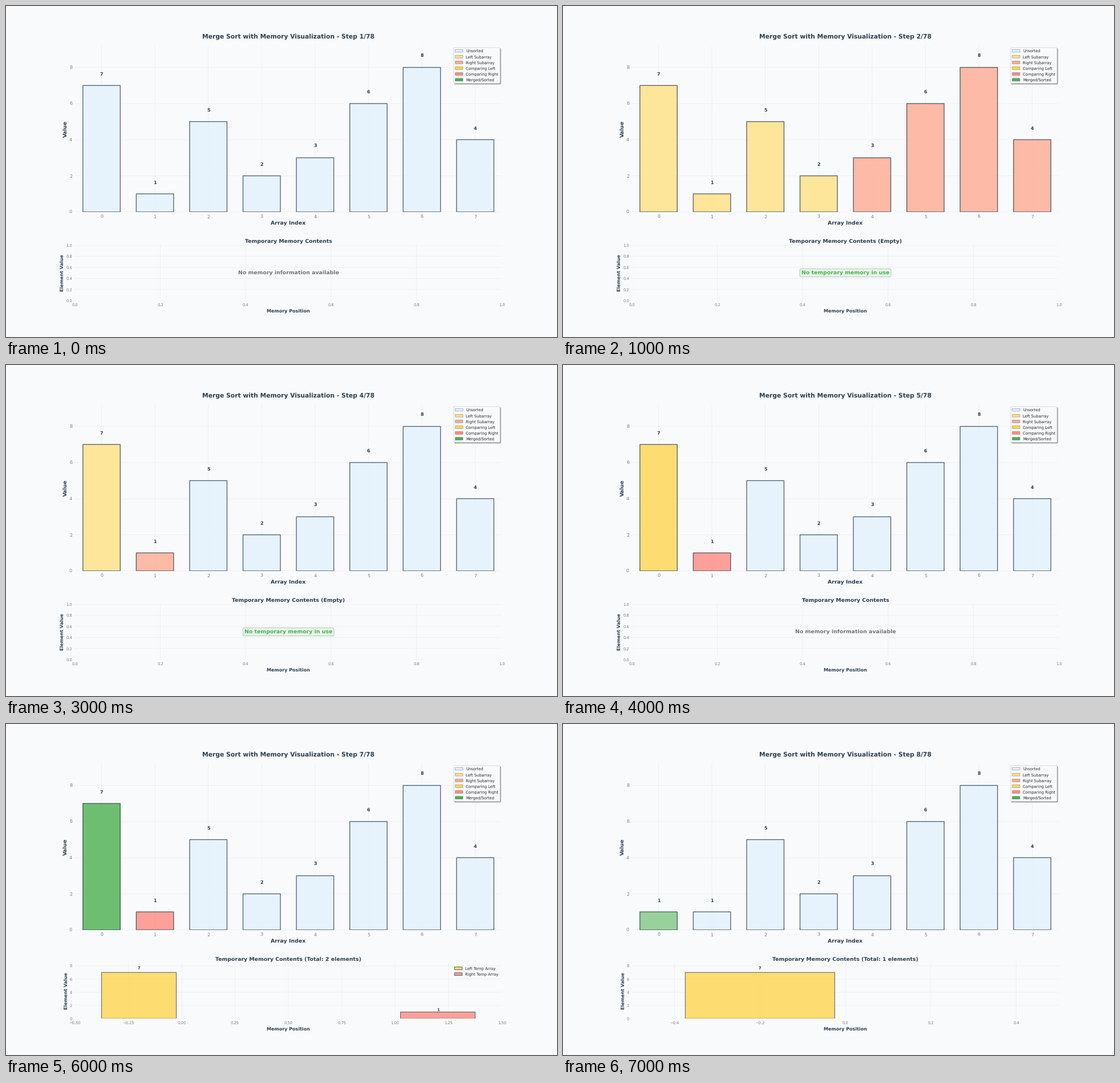
Write a matplotlib script that moves like this. It is 966 by 580 pixels and loops after 8000 ms.

```python
import matplotlib.pyplot as plt
import numpy as np
from matplotlib.animation import FuncAnimation
from matplotlib.patches import Patch

DPI = 48.3
BG, INK, TICK = "#f8fafc", "#2c3e50", "#808080"

plt.rcParams.update({
    "font.family": "DejaVu Sans",
    "text.hinting": "none",
    "text.color": "0.15",
    "path.snap": False,
    "figure.facecolor": BG,
    "axes.facecolor": BG,
    "axes.axisbelow": True,
    "axes.titlecolor": INK,
    "axes.titleweight": "bold",
    "axes.labelcolor": INK,
    "axes.labelweight": "bold",
    "grid.color": "0.8",
    "grid.linewidth": 1,
    "grid.alpha": 0.3,
    "legend.fontsize": 10,
})
for side in ("left", "right", "top", "bottom"):
    plt.rcParams["axes.spines." + side] = False
for tick in ("xtick", "ytick"):
    plt.rcParams[tick + ".major.size"] = 0
    plt.rcParams[tick + ".major.pad"] = 7
    plt.rcParams[tick + ".color"] = TICK

COLORS = {
    "Unsorted": "#e3f2fd",
    "Left Subarray": "#ffe082",
    "Right Subarray": "#ffab91",
    "Comparing Left": "#ffd54f",
    "Comparing Right": "#ff8a80",
    "Merged/Sorted": "#4caf50",
}
PLACED = "#81c784"
PLAIN, LEFT, RIGHT, CMP_LEFT, CMP_RIGHT, MERGED = COLORS.values()

START = [7, 1, 5, 2, 3, 6, 8, 4]
AFTER = [1] + START[1:]
TOTAL_STEPS = 78

# Each step: array, colours of the leading bars, memory.
# Memory is None (unknown) or a pair of temporary lists (left, right).
EMPTY, BOTH = ([], []), ([7], [1])
STEPS = [
    (START, [], None),
    (START, [LEFT] * 4 + [RIGHT] * 4, EMPTY),
    (START, [LEFT] * 2 + [RIGHT] * 2, EMPTY),
    (START, [LEFT, RIGHT], EMPTY),
    (START, [CMP_LEFT, CMP_RIGHT], None),
    (START, [CMP_LEFT, CMP_RIGHT], BOTH),
    (START, [MERGED, CMP_RIGHT], BOTH),
    (AFTER, [PLACED], ([7], [])),
]

fig, (ax, mem_ax) = plt.subplots(
    2, 1, figsize=(966 / DPI, 580 / DPI), dpi=DPI,
    gridspec_kw={"height_ratios": [3, 1], "hspace": 0.3,
                 "left": 0.125, "right": 0.9, "bottom": 0.11, "top": 0.88})


def label(axes, x, y, value, size):
    axes.text(x, y, str(value), ha="center", va="bottom",
              fontsize=size, fontweight="bold", color=INK)


def set_view(axes, xlim, ylim, xticks, yticks):
    axes.set(xlim=xlim, ylim=ylim, xticks=xticks, yticks=yticks)
    axes.grid(True)


def draw_array(step, values, lead):
    ax.clear()
    count = len(values)
    fills = lead + [PLAIN] * (count - len(lead))
    ax.bar(range(count), values, width=0.7, color=fills,
           edgecolor=INK, linewidth=2, alpha=0.8)
    for i, value in enumerate(values):
        label(ax, i, value + 0.5, value, 12)
    set_view(ax, (-0.5, count - 0.5), (0, 9.2), range(count), range(0, 9, 2))
    ax.tick_params(labelsize=12)
    ax.set_title(f"Merge Sort with Memory Visualization - Step {step}/{TOTAL_STEPS}",
                 fontsize=16, pad=20)
    ax.set_xlabel("Array Index", fontsize=14)
    ax.set_ylabel("Value", fontsize=14)
    keys = [Patch(facecolor=c, edgecolor=INK, linewidth=0.5, label=name)
            for name, c in COLORS.items()]
    ax.legend(handles=keys, loc="upper right", frameon=True,
              fancybox=True, shadow=True)


def draw_message(text, color, box=None):
    mem_ax.text(0.5, 0.5, text, ha="center", va="center", fontsize=14,
                fontweight="bold", color=color, bbox=box)
    fifths = np.linspace(0, 1, 6)
    set_view(mem_ax, (0, 1), (0, 1), fifths, fifths)


def draw_temp(left, right):
    total = len(left) + len(right)
    groups = [("Left Temp Array", left, 0, -0.2, CMP_LEFT),
              ("Right Temp Array", right, len(left), 0.2, CMP_RIGHT)]
    for name, values, first, shift, color in groups:
        if not values:
            continue
        xs = np.arange(len(values)) + first + shift
        mem_ax.bar(xs, values, width=0.35, color=color, edgecolor=INK,
                   linewidth=1.5, alpha=0.8, label=name)
        for x, value in zip(xs, values):
            label(mem_ax, x, value * 1.05, value, 10)
    if total > 1:
        xticks = np.linspace(-0.5, 1.5, 9)
        mem_ax.legend(loc="upper right", frameon=False)
    else:
        xticks = np.linspace(-0.4, 0.4, 5)
    top = 1.2 * max(left + right)
    set_view(mem_ax, (-0.5, total - 0.5), (0, top), xticks, range(0, 9, 2))


def draw_memory(memory):
    mem_ax.clear()
    title = "Temporary Memory Contents"
    if memory is None:
        draw_message("No memory information available", "#757575")
    elif not any(memory):
        title += " (Empty)"
        box = dict(boxstyle="round,pad=0.3", facecolor="#e8f5e9",
                   edgecolor="#9fb5a1", linewidth=1)
        draw_message("No temporary memory in use", "#4caf50", box)
    else:
        title += f" (Total: {sum(map(len, memory))} elements)"
        draw_temp(*memory)
    mem_ax.tick_params(labelsize=10)
    mem_ax.set_title(title, fontsize=14)
    mem_ax.set_xlabel("Memory Position", fontsize=12)
    mem_ax.set_ylabel("Element Value", fontsize=12)


def update(i):
    values, lead, memory = STEPS[i]
    draw_array(i + 1, values, lead)
    draw_memory(memory)
    return []


anim = FuncAnimation(fig, update, frames=len(STEPS), interval=1000,
                     init_func=lambda: [], repeat=True, repeat_delay=0,
                     blit=False)
plt.show()
```
